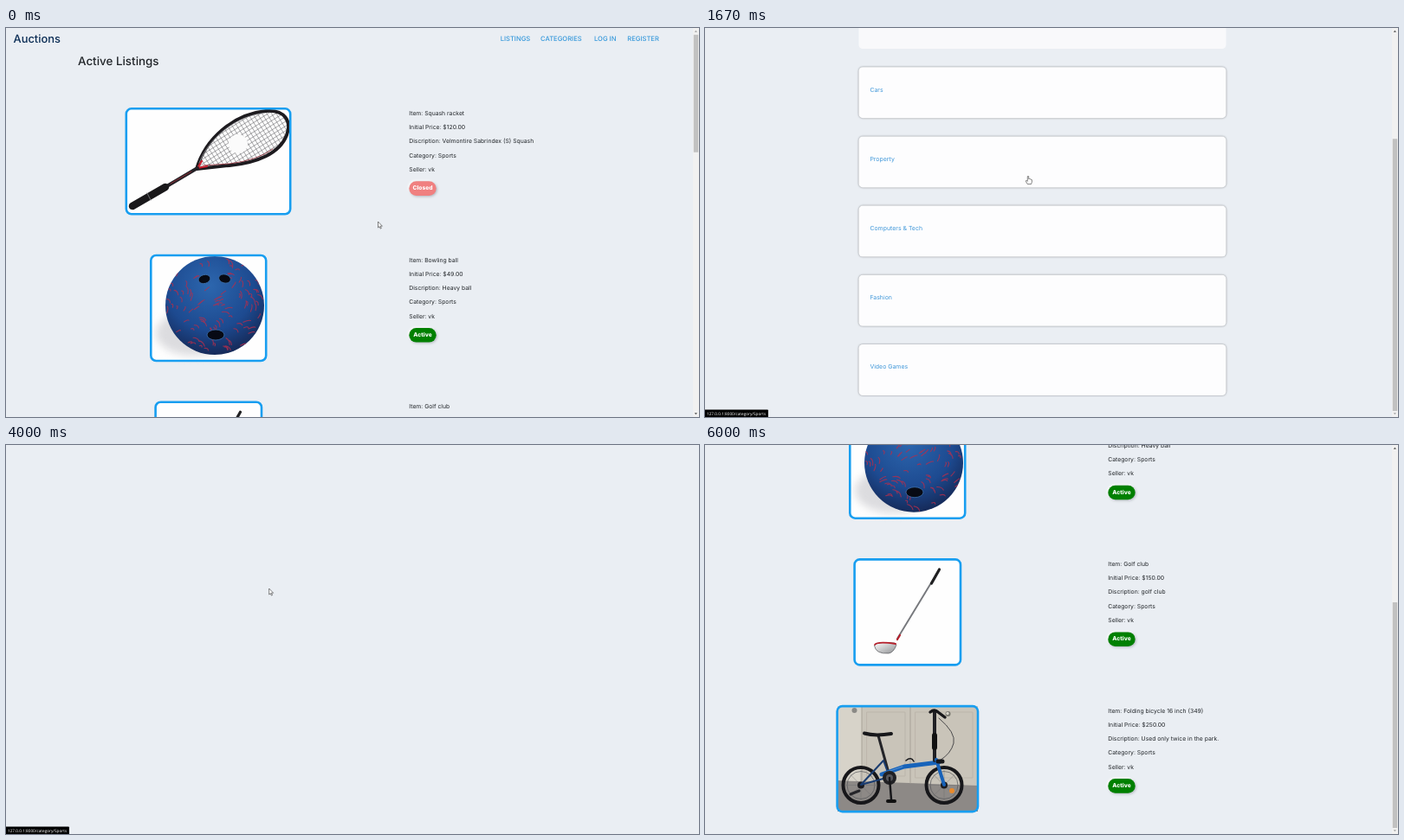
Write an HTML page that moves like this. It is 800 px wide and 450 px high and loops after 6.08 s.

```html
<!DOCTYPE html>
<html lang="en">
<head>
<meta charset="utf-8">
<title>Auctions</title>
<style>
html, body { margin: 0; width: 100%; height: 100%; overflow: hidden; background: #eaeef3; }
svg { display: block; width: 800px; height: 450px; }
text { font-family: Inter, "Open Sans", sans-serif; font-size: 6.8px; fill: #212529; text-rendering: geometricPrecision; white-space: pre; }
.brand { font-size: 12.9px; font-weight: 500; fill: #0b2d55; }
.nav { font-size: 7.6px; font-weight: 500; fill: #3498db; }
.title { font-size: 13.4px; font-weight: 500; }
.subtitle { font-size: 8.8px; font-weight: 500; }
.link { font-size: 6.95px; fill: #3f97d9; }
.badge { font-size: 6.7px; font-weight: 800; fill: #fff; text-anchor: middle; }
.pill { filter: drop-shadow(1.5px 1.5px 1.5px #aab0b8) drop-shadow(-1px -1px 1px #fff); }
.shade { fill: #85888c; filter: blur(1.2px); }
.frame { fill: none; stroke: #189ef0; stroke-width: 2.6; }
.status text { font-family: "Open Sans", sans-serif; font-size: 4.7px; fill: #fff; }
.line { fill: none; stroke-linecap: round; stroke-linejoin: round; }
</style>
</head>
<body>
<svg id="stage" viewBox="0 0 800 450">
  <defs>
    <radialGradient id="ballFill" cx=".45" cy=".3" r=".75">
      <stop offset="0" stop-color="#2c66ae"/><stop offset=".6" stop-color="#1d4a90"/><stop offset="1" stop-color="#14244f"/>
    </radialGradient>
    <linearGradient id="clubFill" x1="0" y1="0" x2="1" y2="1">
      <stop offset="0" stop-color="#fff"/><stop offset="1" stop-color="#8d8f92"/>
    </linearGradient>
    <pattern id="strings" width="4.6" height="4.6" patternUnits="userSpaceOnUse" patternTransform="rotate(-32)">
      <path d="M0 0H4.6M0 0V4.6" stroke="#55555a" stroke-width=".9"/>
    </pattern>
    <clipPath id="ballClip"><circle cx="241" cy="321" r="57"/></clipPath>
  </defs>
  <g id="home"></g>
  <g id="categories"></g>
  <g id="sports"></g>
  <g id="bar">
    <rect x="793" width="7" height="450" fill="#f1f1f1"/>
    <rect id="thumb" x="793.8" width="5.4" fill="#c1c1c1"/>
    <path id="up" d="M794.8 4.8h3.2l-1.6-2z"/>
    <path id="down" d="M794.8 445.2h3.2l-1.6 2z"/>
  </g>
  <g id="status" class="status">
    <path id="bubble"/>
    <text id="address" x="2" y="447.7"></text>
  </g>
  <g id="cursor" fill="#fff" stroke="#333" stroke-width=".6" stroke-linejoin="round">
    <path id="arrow" d="M0 0V7L1.6 5.6 2.7 8.1 3.8 7.6 2.7 5.2H4.9Z"/>
    <path id="hand" d="M-.7 .7Q0-.4 .7 .7V3.6Q1.5 3 2 3.9 2.8 3.4 3.2 4.2 4.3 3.8 4.4 5V7.2L3.5 9.6H-.7L-2.5 6.6Q-3 5.4-1.8 5.4L-.7 6.4Z"/>
  </g>
</svg>
<script>
const LOOP = 6080, STEP = 1000 / 12;
const el = id => document.getElementById(id);
const clamp = x => Math.max(0, Math.min(1, x));
const text = (x, y, cls, s) => `<text x="${x}" y="${y}" class="${cls}">${s.replace('&', '&amp;')}</text>`;
const line = (d, color, width) => `<path class="line" d="${d}" stroke="${color}" stroke-width="${width}"/>`;
const circle = (x, y, r, fill) => `<circle cx="${x}" cy="${y}" r="${r}" fill="${fill}"/>`;

let seed = 11;
const random = () => (seed = seed * 16807 % 2147483647) / 2147483647;

// ---- pictures ----
function racket() {
  const head = 'M220 163C230 128 262 100 300 96C322 94 330 108 324 124C316 145 290 156 258 159Z';
  return `<path d="${head}" fill="url(#strings)"/>` + circle(268, 134, 11, '#fbfbfb') +
    line(head, '#1d1b1f', 3.8) +
    line('M223 156C234 128 264 102 298 98.5', '#a7a7ab', .7) +
    line('M227 159L258 157Q290 153 308 140', '#8c2530', .8) +
    line('M221 162l5-8M221 162l11-2', '#c8202e', 2.2) +
    line('M184 184L221 162', '#242126', 4) +
    line('M190 180L214 166', '#a43039', .8) +
    line('M146 206L184 184', '#19181a', 8.5) +
    line('M163 191l4 8', '#707074', 1);
}

function ball() {
  let veins = '';
  for (let i = 0; i < 95; i++) {
    const a = random() * 6.28, r = 56 * Math.sqrt(random());
    const x = 241 + r * Math.cos(a), y = 321 + r * Math.sin(a);
    const turn = Math.sin(x / 17) + Math.cos(y / 14) - .5, n = 3 + random() * 6;
    const dx = n * Math.cos(turn), dy = n * Math.sin(turn);
    veins += `M${x} ${y}q${dx / 2 + 2} ${dy / 2 - 2} ${dx} ${dy}`;
  }
  const hole = (x, y, rx, ry, tilt) =>
    `<ellipse rx="${rx}" ry="${ry}" transform="translate(${x} ${y}) rotate(${tilt})" fill="#070a14" stroke="#3d70ad" stroke-width=".8"/>`;
  return `<ellipse cx="217" cy="353" rx="44" ry="26" fill="#dcdcdf" style="filter:blur(5px)"/>` +
    circle(241, 321, 57, 'url(#ballFill)') +
    `<g clip-path="url(#ballClip)" opacity=".8">${line(veins, '#b52d4c', 1.1)}</g>` +
    hole(229, 290.5, 7, 5, -15) + hole(252.5, 290, 7, 5, 15) + hole(242, 355, 10, 6, 0);
}

function club() {
  return line('M268 157L222 233', '#77797d', 1.9) + line('M270.5 153L261.5 169', '#202022', 3.2) +
    line('M225 229l-3 5', '#b7202c', 2.2) +
    '<path d="M195.5 241Q198 236 219 238L221 240Q218 249 212 250Q197 251 195.5 241Z" fill="url(#clubFill)" stroke="#55575b" stroke-width=".7"/>' +
    line('M196 240Q199 236 220 239', '#b7202c', 1.8);
}

function bicycle() {
  const wheel = (x, y) => `<circle cx="${x}" cy="${y}" r="20.5" fill="none" stroke="#17171a" stroke-width="4"/>` +
    `<circle cx="${x}" cy="${y}" r="16" fill="none" stroke="#55565a" stroke-width=".7"/>` +
    line(`M${x - 17} ${y}h34M${x} ${y - 17}v34M${x - 12} ${y - 12}l24 24M${x + 12} ${y - 12}l-24 24`, '#6b6b6e', .4) +
    circle(x, y, 4, '#1b1b1f');
  return '<rect x="153" y="311" width="162" height="122" fill="#8d8986"/>' +
    '<path d="M153 311H315V403L153 397Z" fill="#c9c4b9"/><path d="M153 311H181V398L153 397Z" fill="#d7d3c9"/>' +
    line('M181 311V398M237 311V400', '#a8a298', 1) + line('M187 318H231V392H187ZM243 318H309V394H243Z', '#b8b2a7', .8) +
    circle(172.5, 316, 3, '#8a8985') + circle(280.5, 320, 3, '#77766f') + circle(280, 319.5, 1.7, '#d5d2c8') +
    wheel(180, 402.5) + wheel(276, 402.5) +
    line('M200 345L213 392', '#242428', 3) + line('M184 342.5Q196 346 215 343', '#17171a', 4) +
    line('M180 402L213 393L206 374Z', '#1a3c70', 2) +
    line('M204 390L230 381L270 376', '#1763ba', 5) + line('M208 388L228 381', '#5d94d0', 1) +
    line('M232 374q6-5 9 1', '#1b1b1f', 1.6) +
    line('M265 317V374', '#202024', 4) + line('M265 345v14', '#111', 6) +
    line('M260 318q5-4 9 0l8 6', '#17171a', 3.4) +
    line('M270 325Q290 342 287 354T271 374', '#2b2b30', .8) +
    line('M267 373L276 402', '#1862b8', 4) + line('M269 375h5', '#17171a', 5) +
    circle(213, 394, 8, '#202024') + circle(213, 394, 4, '#55565c') +
    line('M213 394L215 419', '#17171a', 2.5) + line('M211 421h8', '#111', 4) +
    line('M168 413l10-4', '#252529', 3) + circle(285, 409, 3, '#e88a2c');
}

// ---- pages ----
const header = text(8.5, 16.5, 'brand', 'Auctions') + text(570.7, 14.8, 'nav', 'LISTINGS') +
  text(617, 14.8, 'nav', 'CATEGORIES') + text(679, 14.8, 'nav', 'LOG IN') + text(717.3, 14.8, 'nav', 'REGISTER');

const items = [
  { x: 137.5, w: 192, art: racket, lift: 0, name: 'Squash racket', price: 120, note: 'Velmontire Sabrindex (S) Squash', closed: true },
  { x: 166, w: 135.5, art: ball, lift: 0, name: 'Bowling ball', price: 49, note: 'Heavy ball' },
  { x: 171.3, w: 125, art: club, lift: 291.3, name: 'Golf club', price: 150, note: 'golf club' },
  { x: 151.3, w: 165, art: bicycle, lift: 291.3, name: 'Folding bicycle 16 inch (349)', price: 250, note: 'Used only twice in the park.' }
];

function listing(item, i) {
  const top = 92 + i * 169.7;
  const box = `x="${item.x + 1.3}" y="${top + 1.3}" width="${item.w - 2.6}" height="122" rx="6"`;
  const rows = ['Item: ' + item.name, `Initial Price: $${item.price}.00`, 'Discription: ' + item.note, 'Category: Sports', 'Seller: vk'];
  return `<rect ${box} fill="#fefefe"/><g transform="translate(0 ${item.lift})">${item.art()}</g><rect ${box} class="frame"/>` +
    rows.map((s, n) => text(465.3, top + 8.9 + n * 16.25, '', s)).join('') +
    `<rect class="pill" x="465.3" y="${top + 85.3}" width="31.4" height="16.6" rx="8.3" fill="${item.closed ? '#f08080' : 'green'}"/>` +
    text(481, top + 95.4, 'badge', item.closed ? 'Closed' : 'Active');
}

const listings = list => header + text(83, 43.3, 'title', 'Active Listings') + list.map(listing).join('');
const names = ['Food', 'Sports', 'Cars', 'Property', 'Computers & Tech', 'Fashion', 'Video Games'];

function card(name, i) {
  const y = 57 + i * 80.2, box = `x="177.5" y="${y}" width="424" height="59" rx="4.5"`;
  return `<rect ${box} class="shade"/><rect ${box} class="face" fill="#fdfdfe"/>` + text(190.4, y + 28.5, 'link', name);
}

el('home').innerHTML = listings(items.slice(0, 3));
el('sports').innerHTML = listings(items);
el('categories').innerHTML = header + text(184.3, 30.7, 'subtitle', 'Categories') + names.map(card).join('');
const [shades, faces, links] = ['.shade', '.face', '.link'].map(s => [...el('categories').querySelectorAll(s)]);

// ---- timeline: [ms, value...] ----
const path = [[0, 429.5, 224], [80, 436, 216], [330, 560, 82], [580, 637, 10], [750, 637, 10], [1000, 574, 77],
  [1330, 385, 164], [1500, 373, 171], [2170, 373, 171], [2500, 370, 173], [2917, 363.3, 214.7], [3080, 356, 222],
  [3420, 318, 188], [3750, 303.7, 166], [4170, 303.7, 166], [4580, 312, 172], [5083, 317.5, 178], [5330, 240, 200],
  [5580, 146, 190], [5830, 570, 60], [5990, 577, -14]];
const scrolls = {
  home: [[0, 0]],
  categories: [[1333, 0], [1417, 18], [1500, 92], [1583, 152], [1667, 172.3], [2417, 172.3], [2500, 140], [2583, 70],
    [2667, 25], [2750, 12], [2833, 7], [2917, 3.5], [3083, 1], [3500, 0]],
  sports: [[4500, 0], [4583, 22], [4667, 70], [4750, 122], [4917, 236], [5000, 272], [5083, 291.3], [5167, 298], [5250, 300.3]]
};
const heights = { home: 1440, categories: 622, sports: 750 };
const hovers = [[1000, 1150, 0], [1225, 1700, 1], [1700, 3080, 3], [3080, 3340, 2], [3340, 4000, 1]];
const hands = [[580, 820], [910, 1150], [1225, 3990]];

function at(keys, t) {
  const n = keys.findIndex(k => k[0] > t);
  if (n === 0) return keys[0].slice(1);
  if (n < 0) return keys[keys.length - 1].slice(1);
  const a = keys[n - 1], b = keys[n], p = (t - a[0]) / (b[0] - a[0]);
  return a.slice(1).map((v, i) => v + (b[i + 1] - v) * p);
}

const show = (node, on) => node.setAttribute('display', on ? 'inline' : 'none');

function drawStatus(t) {
  const opacity = t < 910 || t >= 4240 ? 0 : clamp(.2 + (t - 1000) / 250);
  const hover = hovers.filter(h => t >= h[0]).pop();
  const name = names[hover ? hover[2] : 0];
  const width = { Food: 70, Cars: 69, Property: 77.5 }[name] || 73;
  show(el('status'), opacity > 0);
  el('bubble').setAttribute('d', `M0 441.5H${width - 1}q1 0 1 1V450H0Z`);
  el('bubble').setAttribute('opacity', opacity);
  el('address').textContent = '127.0.0.1:8000/category/' + name;
}

function draw(now) {
  const t = Math.floor((now % LOOP + 4) / STEP) % 73 * STEP;
  const page = t < 830 ? 'home' : t < 3910 ? 'categories' : t < 4160 ? '' : 'sports';
  for (const id in heights) show(el(id), id === page);
  show(el('bar'), page);
  if (page) {
    const [y] = at(scrolls[page], t), h = heights[page];
    el(page).setAttribute('transform', `translate(0 ${-y})`);
    el('thumb').setAttribute('y', 7.8 + 435 * y / h);
    el('thumb').setAttribute('height', 435 * 450 / h);
    el('up').setAttribute('fill', y > .5 ? '#505050' : '#a3a3a3');
    el('down').setAttribute('fill', y < h - 450.5 ? '#505050' : '#a3a3a3');
  }
  names.forEach((_, i) => {
    const k = Math.max(0, ...hovers.filter(h => h[2] === i)
      .map(h => clamp((t - h[0]) / 160) * (1 - clamp((t - h[1]) / 160))));
    shades[i].style.opacity = 1 - k;
    faces[i].style.opacity = 1 - .2 * k;
    links[i].style.opacity = 1 - .55 * k;
  });
  drawStatus(t);
  const [x, y] = at(path, t), hand = hands.some(h => t >= h[0] && t < h[1]);
  el('cursor').setAttribute('transform', `translate(${x} ${y})`);
  show(el('hand'), hand);
  show(el('arrow'), !hand);
}

const start = performance.now();
function tick() {
  draw(performance.now() - start);
  requestAnimationFrame(tick);
}
tick();
</script>
</body>
</html>
```
